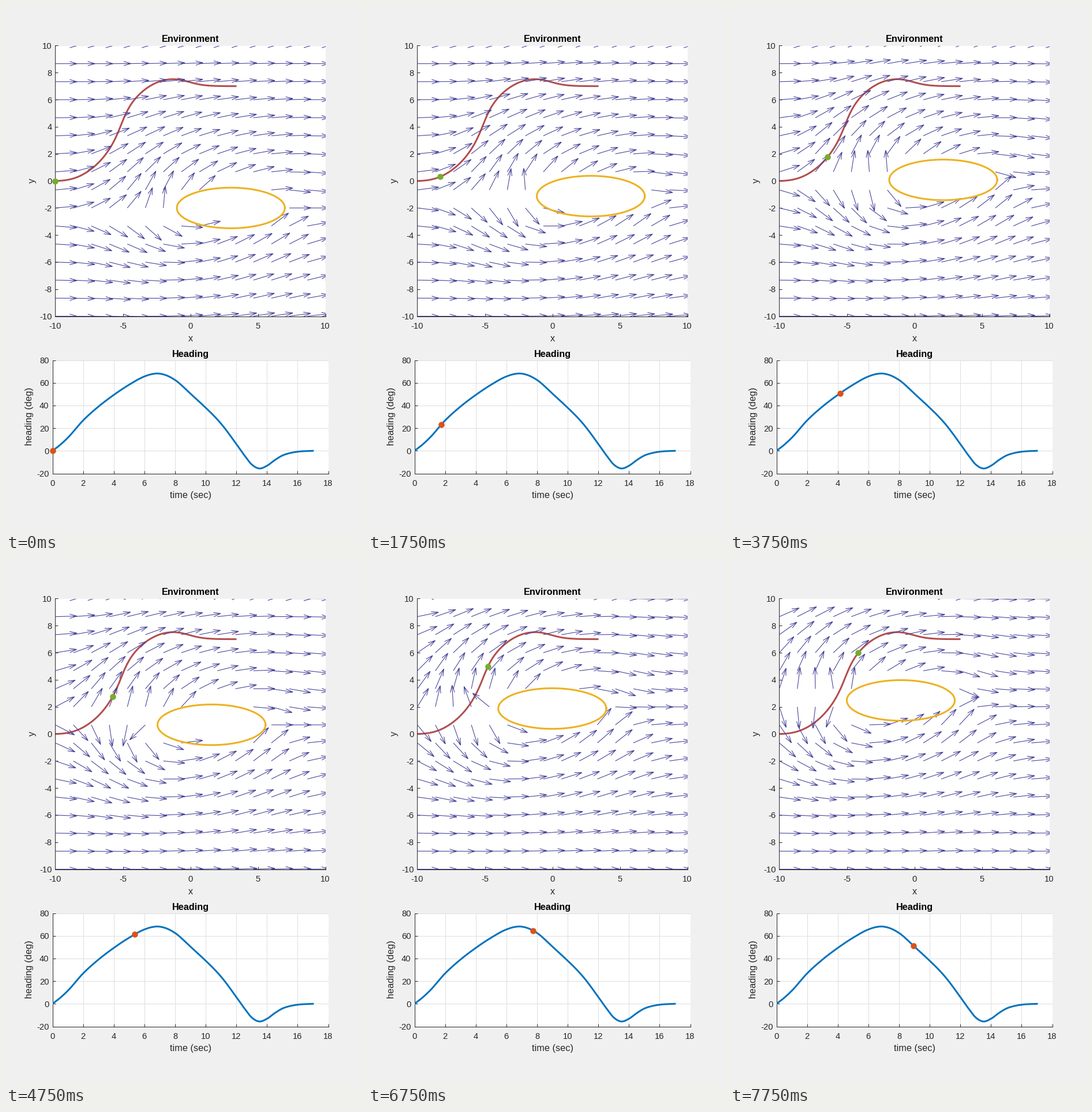
These frames come from a looping animation (617x908 px, 8 s). A matplotlib script:

```python
import numpy as np
import matplotlib.pyplot as plt
from matplotlib.animation import FuncAnimation

W, H, DPI = 617, 908, 64
PT = 72 / DPI  # points per pixel
INK, PAPER = "#262626", "#f0f0f0"
A, B = 4.0, 1.5  # obstacle semi-axes
ARROW = 0.9 * 1.25 * np.sqrt(2)

plt.rcParams["font.family"] = "Liberation Sans"
fig = plt.figure(figsize=(W / DPI, H / DPI), dpi=DPI, facecolor=PAPER)


def label(x, y, text, size, ha="center", **kw):
    fig.text(x / W, 1 - y / H, text, fontsize=size * PT, ha=ha, va="baseline",
             rotation_mode="anchor", **kw)


def make_axes(left, top, right, bottom, xlim, ylim, xticks, yticks):
    ax = fig.add_axes([left / W, 1 - bottom / H, (right - left) / W, (bottom - top) / H])
    ax.set(xlim=xlim, ylim=ylim, xticks=xticks, yticks=yticks)
    ax.tick_params(direction="in", length=5 * PT, width=PT, color=INK,
                   labelbottom=False, labelleft=False)
    for side, spine in ax.spines.items():
        spine.set(visible=side in ("left", "bottom"), color=INK, linewidth=PT)
    for v in xticks:
        x = left + (v - xlim[0]) / (xlim[1] - xlim[0]) * (right - left)
        label(x, bottom + 21.5, f"{v}", 14.7, color=INK)
    for v in yticks:
        y = bottom - (v - ylim[0]) / (ylim[1] - ylim[0]) * (bottom - top)
        label(left - 6, y + 5.5, f"{v}", 14.7, ha="right", color=INK)
    return ax


def smooth(x, xs, ys):
    """Cubic Hermite curve through a few points."""
    xs, ys = np.asarray(xs, float), np.asarray(ys, float)
    slope = np.gradient(ys, xs)
    i = np.clip(np.searchsorted(xs, x, side="right") - 1, 0, len(xs) - 2)
    h = xs[i + 1] - xs[i]
    s = np.clip((x - xs[i]) / h, 0, 1)
    return ((1 + 2 * s) * (1 - s) ** 2 * ys[i] + s * (1 - s) ** 2 * h * slope[i]
            + s * s * (3 - 2 * s) * ys[i + 1] + s * s * (s - 1) * h * slope[i + 1])


# Heading over time; the path follows from it at unit speed
time = np.linspace(0, 17, 1701)
heading = smooth(
    time,
    [0, .5, 1, 2, 3, 4, 5, 6, 6.5, 6.9, 7.3, 8, 9, 10, 10.5, 11, 12, 12.5, 13, 13.5,
     14, 14.5, 15, 15.5, 16, 17],
    [0, 5.2, 11.5, 26.8, 39, 49.3, 58.3, 65.6, 67.7, 68.2, 67.2, 62.5, 50.5, 38, 31.4, 24,
     6, -3.5, -12, -15.6, -13.2, -8.3, -4.2, -2, -.8, 0])


def travel(rate):
    return np.concatenate([[0], np.cumsum((rate[1:] + rate[:-1]) / 2 * np.diff(time))])


path_x = -10 + travel(np.cos(np.radians(heading)))
path_y = travel(np.sin(np.radians(heading)))

angle = np.linspace(0, 2 * np.pi, 721)
rim = np.column_stack([A * np.cos(angle), B * np.sin(angle)])
axis = np.linspace(-10, 10, 16)
grid = np.stack(np.meshgrid(axis, axis), -1).reshape(-1, 2)


def obstacle(t):
    return np.array([3 - 0.05 * t * t, -2 + 0.5 * t]), np.array([-0.1 * t, 0.5])


def flow(t):
    """Unit directions of the flow around the moving obstacle, and their tails."""
    centre, velocity = obstacle(t)
    rel = grid - centre
    outside = (rel[:, 0] / A) ** 2 + (rel[:, 1] / B) ** 2 > 1
    rel, tails = rel[outside], grid[outside]
    gaps = np.linalg.norm(rel[:, None] - rim[None], axis=2)
    nearest = gaps.argmin(axis=1)
    dist = gaps.min(axis=1)
    normal = np.column_stack([np.cos(angle[nearest]) / A, np.sin(angle[nearest]) / B])
    normal /= np.linalg.norm(normal, axis=1, keepdims=True)
    side = np.where(rel[:, 1] > -1e-6, 1, -1)[:, None]
    tangent = side * np.column_stack([normal[:, 1], -normal[:, 0]])

    reach = [0, 1, 2.33, 3.67, 5, 6.33, 7.67, 9, 11, 13]
    block = smooth(dist, reach, [1.1, .97, .77, .56, .43, .3, .18, .08, .01, 0])
    swirl = smooth(dist, reach, [.1, .34, .66, .53, .44, .36, .23, .08, .01, 0])
    closing = normal @ (np.array([1, 0]) - velocity)
    block = np.where(closing > 0, block * (1 - 0.8 * np.clip(normal[:, 0], 0, 1)), block)
    push = -block * closing
    slide = swirl * np.maximum(-closing, 0)
    out = np.array([1, 0]) + push[:, None] * normal + slide[:, None] * tangent
    return tails, out / np.linalg.norm(out, axis=1, keepdims=True)


def arrow_lines(t):
    tails, d = flow(t)
    d = d * ARROW
    across = np.column_stack([-d[:, 1], d[:, 0]]) * 0.1
    tips, back = tails + d, tails + 0.67 * d
    gap = np.full_like(tails, np.nan)
    parts = [tails, tips, gap, back + across, tips, back - across, gap]
    return np.stack(parts, 1).reshape(-1, 2).T


env = make_axes(85.5, 68.5, 553.5, 536.5, (-10, 10), (-10, 10),
                range(-10, 11, 5), range(-10, 11, 2))
plot = make_axes(80.5, 612.5, 558.5, 808.5, (0, 18), (-20, 80),
                 range(0, 19, 2), range(-20, 81, 20))
plot.grid(color="#dedede", linewidth=PT)
plot.set_axisbelow(True)

label(319.5, 62.5, "Environment", 16.2, weight="bold", color="black")
label(319.5, 606.5, "Heading", 16.2, weight="bold", color="black")
label(319.5, 579.5, "x", 16.2, color=INK)
label(50, 302, "y", 16.2, rotation=90, color=INK)
label(319.5, 851.5, "time (sec)", 16.2, color=INK)
label(45.5, 710, "heading (deg)", 16.2, rotation=90, color=INK)

env.plot(path_x, path_y, color="#b34d4d", lw=3 * PT, zorder=2)
arrows, = env.plot([], [], color="#48459a", lw=1.1 * PT, zorder=3,
                   solid_joinstyle="miter", solid_capstyle="butt")
ring, = env.plot([], [], color="#edb120", lw=3 * PT, zorder=4)
plot.plot(time, heading, color="#0072bd", lw=3 * PT, zorder=3)
dot = dict(marker="o", ms=10.5 * PT, mew=0, ls="none", zorder=6, clip_on=False)
vehicle, = env.plot([], [], color="#77ac30", **dot)
gauge, = plot.plot([], [], color="#d95319", **dot)


def update(frame):
    step = max(frame - 1, 0)
    t = max(0.3 * step - 0.05, 0)
    centre, _ = obstacle(t)
    arrows.set_data(*arrow_lines(t))
    ring.set_data(*(rim + centre).T)
    vehicle.set_data([np.interp(t, time, path_x)], [np.interp(t, time, path_y)])
    gauge.set_data([t], [np.interp(t, time, heading)])
    return arrows, ring, vehicle, gauge


anim = FuncAnimation(fig, update, frames=32, interval=250, repeat=True, repeat_delay=0)
plt.show()
```
